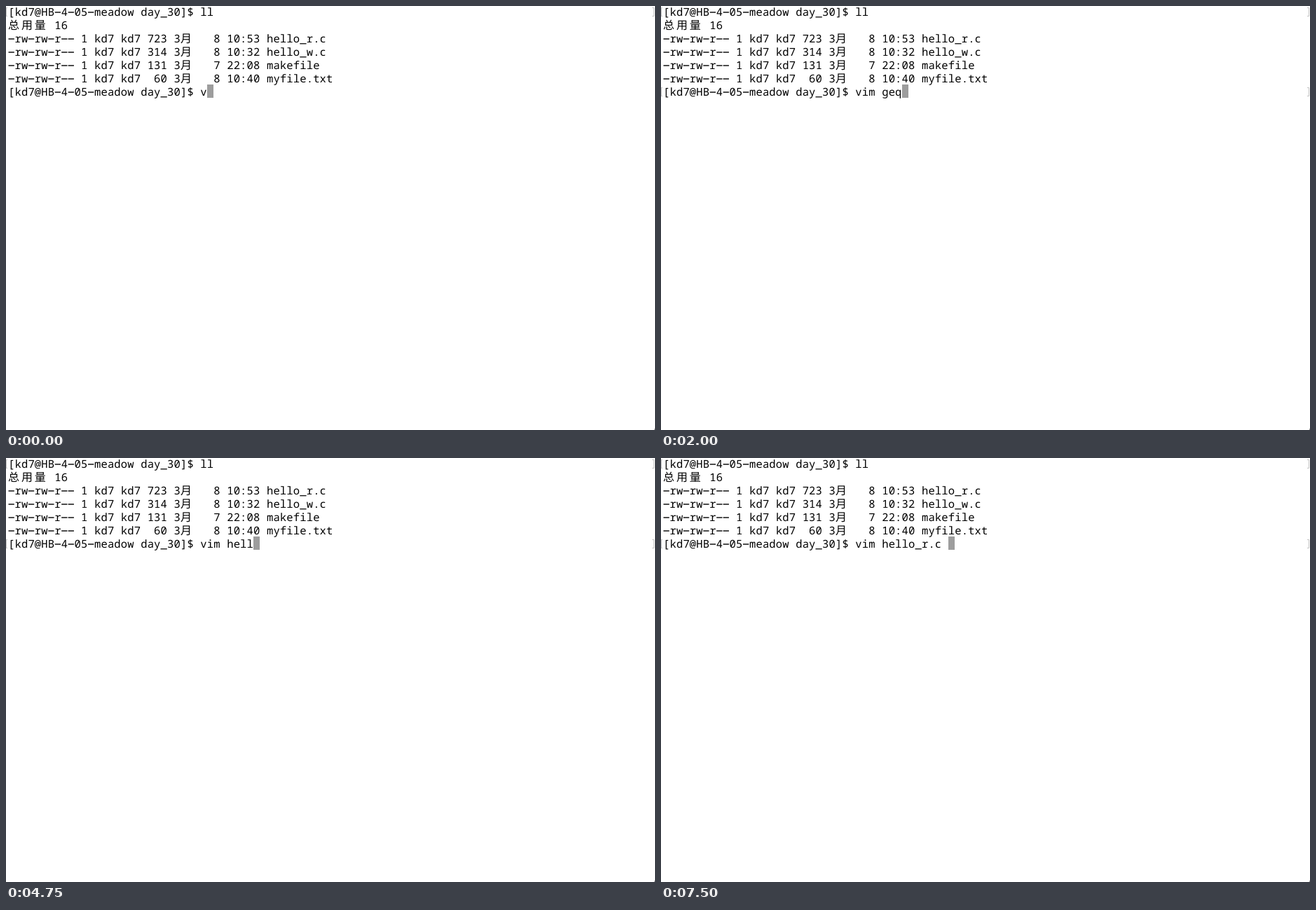
These frames come from a looping animation (926x605 px, 8000 ms). An HTML page:

```html
<!DOCTYPE html>
<html lang="zh-CN">
<head>
<meta charset="utf-8">
<title>Terminal</title>
<style>
html, body { margin: 0; width: 100%; height: 100%; overflow: hidden; background: #fff; }
svg { display: block; width: 926px; height: 605px; background: #fff; --ink: #000; --cursor: #9d9d9d; }
svg.bell { background: #f2f2f2; --ink: #141414; --cursor: #a3a3a3; }
svg.soft { background: #f5f5f5; }
text {
  font: 15.5px "Noto Sans Mono", "DejaVu Sans Mono", monospace;
  letter-spacing: .16px; white-space: pre; fill: var(--ink);
  text-rendering: geometricPrecision;
}
.cjk { font: 16px "Noto Sans CJK SC", "Noto Sans CJK", sans-serif; letter-spacing: 2.92px; }
.dash { fill: transparent; }
.bar { fill: var(--ink); }
.mark { fill: none; stroke: #c4c4c4; }
#cursor { fill: var(--cursor); }
</style>
</head>
<body>
<svg id="stage" viewBox="0 0 926 605">
  <g id="marks"></g>
  <g id="screen"></g>
  <g id="input"></g>
  <rect id="cursor" y="112" width="9" height="19"/>
  <rect x="925" y="603" width="1" height="2" fill="#999"/>
</svg>
<script>
const LOOP = 8000, CELL = 9.46, LEFT = 3, ROW = 19, BASE = 14;
const USER = 'kd7';
const PROMPT = `[${USER}@HB-4-05-meadow day_30]$ `;
const file = (size, day, name) => `-rw-rw-r-- 1 ${USER} ${USER} ${size} 3月   ${day} ${name}`;
const LINES = [
  PROMPT + 'll',
  '总用量 16',
  file('723', '8 10:53', 'hello_r.c'),
  file('314', '8 10:32', 'hello_w.c'),
  file('131', '7 22:08', 'makefile'),
  file(' 60', '8 10:40', 'myfile.txt')
];
// start time, command line, bell style
const STEPS = [
  [0, 'v'], [250, 'vim'], [750, 'vim '], [1250, 'vim ge'],
  [1750, 'vim geq', 'bell'], [2000, 'vim geq'],
  [2250, 'vim ge'], [2500, 'vim g'], [2750, 'vim '],
  [3500, 'vim he'], [4750, 'vim hell'],
  [5000, 'vim hello_', 'bell soft'], [5250, 'vim hello_'],
  [6500, 'vim hello_r'], [7500, 'vim hello_r.c ']
];
const MARK_START = 1500;

const $ = id => document.getElementById(id);
const colX = col => LEFT + col * CELL;

function add(parent, tag, attrs, content = '') {
  const el = document.createElementNS('http://www.w3.org/2000/svg', tag);
  for (const key in attrs) el.setAttribute(key, attrs[key]);
  el.textContent = content;
  return parent.appendChild(el);
}

// Lays text on the cell grid: CJK takes two cells, hyphens get wide bars.
function drawRow(parent, row, str) {
  const y = BASE + ROW * row;
  const text = add(parent, 'text', { y });
  let col = 0;
  for (const part of str.match(/-|[\u4e00-\u9fff]+|[^-\u4e00-\u9fff]+/g)) {
    const wide = part > '\u4e00', dash = part === '-', x = colX(col);
    add(text, 'tspan', { x, class: wide ? 'cjk' : dash ? 'dash' : '' }, part);
    if (dash) add(parent, 'rect', { class: 'bar', x: x + .5, y: y - 5.7, width: 8.3, height: 1.4 });
    col += part.length * (wide ? 2 : 1);
  }
}

function drawMarks(row) {
  const y = 2.5 + ROW * row;
  return add($('marks'), 'path', {
    class: 'mark',
    d: `M2 ${y}H.5v12H2M922 ${y}h2.5v12H922`
  });
}

LINES.forEach((line, row) => drawRow($('screen'), row, line));
drawMarks(0);
const lastMarks = drawMarks(LINES.length);

let shown;
function frame(now) {
  const t = now % LOOP;
  const step = STEPS.findLast(s => s[0] <= t);
  if (step !== shown) {
    shown = step;
    const line = PROMPT + step[1];
    $('input').replaceChildren();
    drawRow($('input'), LINES.length, line);
    $('cursor').setAttribute('x', Math.round(colX(line.length)));
    $('stage').setAttribute('class', step[2] || '');
  }
  lastMarks.style.display = t < MARK_START ? 'none' : '';
}

const start = performance.now();
function tick() {
  frame(performance.now() - start);
  requestAnimationFrame(tick);
}
tick();
</script>
</body>
</html>
```
